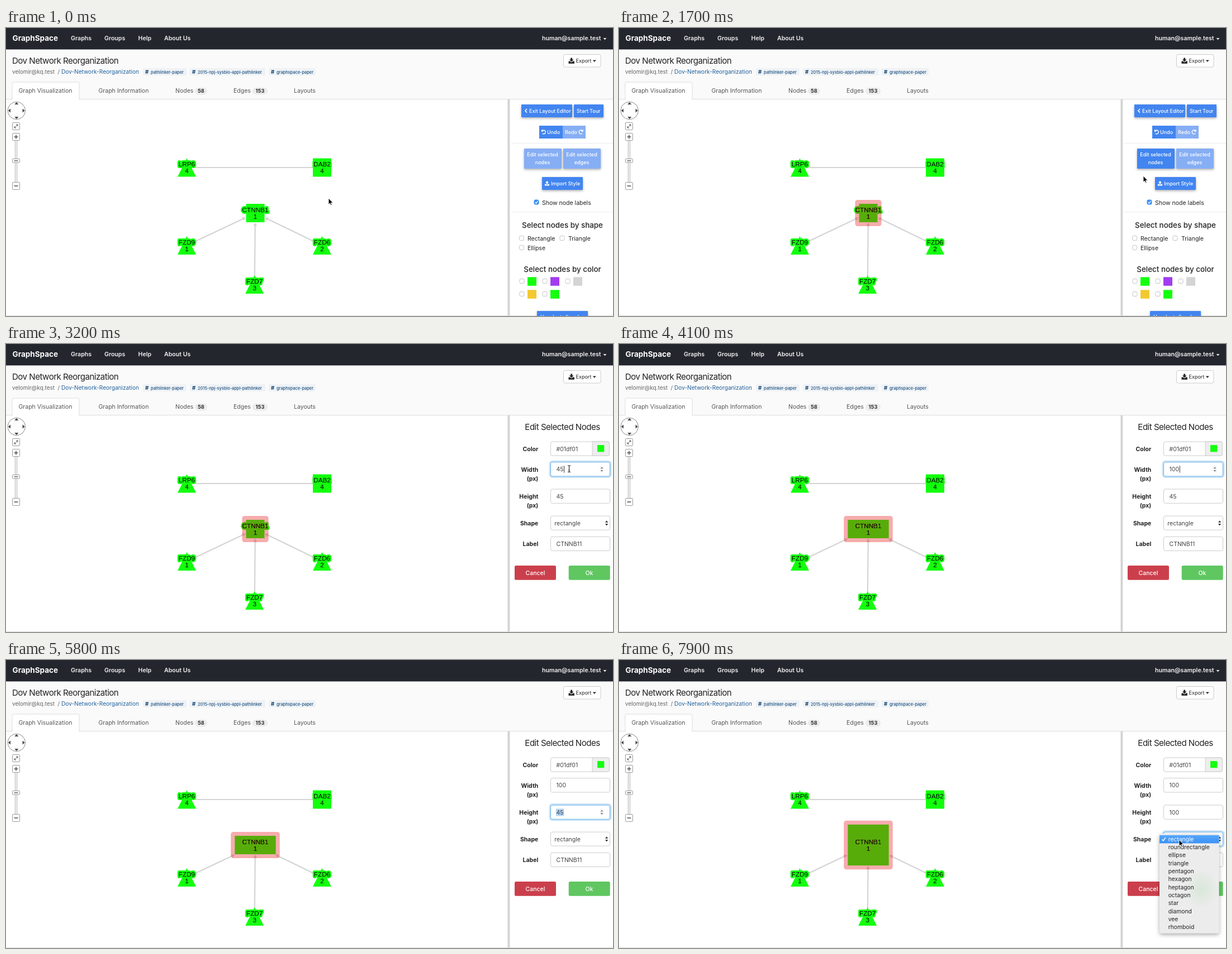
Write an HTML page that moves like this. It is 1086x516 px and loops after 8 s.

```html
<!DOCTYPE html>
<html lang="en">
<head>
<meta charset="utf-8">
<title>Graph layout editor</title>
<style>
html, body { margin: 0; width: 100%; height: 100%; overflow: hidden; background: #fff; }
svg { display: block; width: 1086px; height: 516px; font-family: Inter, sans-serif; font-size: 10.5px; }
text { white-space: pre; }
.label { font: 11.73px "Liberation Sans", Arial, sans-serif; text-anchor: middle; }
.title { font-size: 15.1px; letter-spacing: -.52px; }
</style>
</head>
<body>
<svg viewBox="0 0 1086 516">
  <defs>
    <filter id="lift" x="-20%" y="-30%" width="140%" height="190%">
      <feDropShadow dx="0" dy="1.8" stdDeviation="2" flood-color="#000" flood-opacity=".33"/>
    </filter>
    <filter id="menu" x="-20%" y="-10%" width="140%" height="125%">
      <feDropShadow dx="0" dy="3" stdDeviation="3.5" flood-color="#000" flood-opacity=".33"/>
    </filter>
    <linearGradient id="pick" x2="0" y2="1">
      <stop stop-color="#57a6fa"/><stop offset="1" stop-color="#3a92f6"/>
    </linearGradient>
    <radialGradient id="tint">
      <stop stop-color="#5fc660" stop-opacity=".14"/><stop offset="1" stop-color="#5fc660" stop-opacity="0"/>
    </radialGradient>
  </defs>
  <g id="page"></g>
  <g id="graph"></g>
  <g id="panel"></g>
  <g id="pointer"></g>
</svg>
<script>
const LOOP = 8000, STEP = 100;
const GREEN = '#13ff0d', BLUE = '#4285f0', PALE = '#86aef4', EDGE = '#d4d4d4';
const SCALE = 33 / 45;
const $ = id => document.getElementById(id);

const rect = (x, y, w, h, fill, more = '') =>
  `<rect x="${x}" y="${y}" width="${w}" height="${h}" fill="${fill}" ${more}/>`;
const text = (x, y, s, more = '') => `<text x="${x}" y="${y}" ${more}>${s}</text>`;
const path = (d, more = '') => `<path d="${d}" ${more}/>`;
const size = (px, weight = 400) => ` font-size="${px}" font-weight="${weight}"`;
const mid = 'text-anchor="middle"';
const end = 'text-anchor="end"';
const line = (color, w = 1) => `fill="none" stroke="${color}" stroke-width="${w}"`;

// ---------- fixed page parts ----------

function tag(x, w, s) {
  return rect(x, 72, w, 13, '#eff2f5', 'rx="1.5"') +
    text(x + 4, 81.6, '#', size(9.5, 800) + ' fill="#1d5080"') +
    text(x + 14, 81.6, s, size(7.4, 500) + ' fill="#1d5080"');
}

function badge(x, w, s) {
  return rect(x, 106.5, w, 13, '#ececec', 'rx="6.5"') +
    text(x + w / 2, 116.4, s, mid + size(9.3, 700) + ' fill="#333"');
}

function header() {
  const nav = [[116, 'Graphs'], [176, 'Groups'], [236.5, 'Help'], [283, 'About Us']];
  const tabs = [[22.5, 'Graph Visualization'], [165.5, 'Graph Information'],
    [303, 'Nodes'], [407, 'Edges'], [515, 'Layouts']];
  return rect(0, 0, 1086, 128, '#fafafa') + rect(0, 0, 1086, 38.4, '#24262e') +
    text(11.5, 23.3, 'GraphSpace', size(13.5, 700) + ' fill="#fff"') +
    nav.map(([x, s]) => text(x, 22.4, s, size(10.6, 600) + ' fill="#f2f2f2"')).join('') +
    text(1064.5, 22.4, 'human@sample.test', end + size(10.6, 600) + ' fill="#f2f2f2"') +
    path('M1068.5 18h6l-3 3.2z', 'fill="#eee"') +
    text(11, 64, 'Dov Network Reorganization', 'class="title" fill="#222"') +
    text(11, 81.5, 'velomir@kq.test', size(10) + ' fill="#666"') +
    text(92.5, 81.5, '/', size(10) + ' fill="#666"') +
    text(99, 81.5, 'Dov-Network-Reorganization', size(10.1) + ' fill="#22629c"') +
    tag(245, 78, 'pathlinker-paper') + tag(329, 135, '2015-npj-sysbio-appl-pathlinker') +
    tag(470, 84, 'graphspace-paper') +
    rect(997.5, 47.5, 66.5, 22.5, '#fff', 'rx="3" stroke="#ccc"') +
    path('M1006.5 59.5h2.5l2.7 2 2.7-2h2.5v4.2h-10.4z M1010.2 53.5h3v3h2.4l-3.9 4-3.9-4h2.4z', 'fill="#222"') +
    text(1019.5, 62.2, 'Export', size(9.05) + ' fill="#222"') +
    path('M1049.8 57.6h6l-3 3.2z', 'fill="#222"') +
    path('M0 127.5H1086', line('#ddd')) +
    path('M11 128.5V100q0-3 3-3H128q3 0 3 3V128.5', 'fill="#fff" stroke="#ddd"') +
    tabs.map(([x, s]) => text(x, 116.2, s, 'fill="#555"')).join('') +
    badge(338, 22, '58') + badge(441, 27, '153');
}

function zoomBar() {
  const box = (y, h) => rect(11.5, y, 13, h, '#fff', 'stroke="#999" rx="1"');
  return '<circle cx="18.8" cy="148" r="15.7" fill="#fff" stroke="#888"/>' +
    path('M15.2 137l3.6-4 3.6 4z M15.2 159l3.6 4 3.6-4z M8 144.4l-4 3.6 4 3.6z M29.6 144.4l4 3.6-4 3.6z', 'fill="#444"') +
    box(169.5, 13) +
    path('M15 179l6-6 M18 173h3v3 M15 176v3h3', line('#555')) +
    rect(16.5, 201, 3, 76, '#fff', 'stroke="#aaa"') +
    box(188.5, 13) + path('M14.5 195h7 M18 191.5v7', line('#555', 1.6)) +
    box(234.5, 6.5) + path('M14.5 237.8h7', line('#555', 1.4)) +
    box(276.5, 13) + path('M14.5 283h7', line('#555', 1.6));
}

$('page').innerHTML = header() + zoomBar() +
  rect(897.5, 128, 3.8, 388, '#d3d3d3') + rect(0, 515, 1086, 1, '#dcdcdc');

// ---------- graph ----------

const nodes = {
  LRP6: [323.5, 250, 4], DAB2: [565.5, 250, 4, 'box'], CTNNB1: [446, 331.5, 1, 'box'],
  FZD9: [323.5, 389.5, 1], FZD6: [565.5, 389.5, 2], FZD7: [444.7, 459.5, 3]
};

function arrow(from, w, h) {
  const [sx, sy] = nodes[from], [cx, cy] = nodes.CTNNB1;
  const dx = sx - cx, dy = sy - cy, len = Math.hypot(dx, dy), ux = dx / len, uy = dy / len;
  const k = Math.min((w / 2 + .8) / Math.abs(ux), (h / 2 + .8) / Math.abs(uy));
  const x = cx + ux * k, y = cy + uy * k, bx = x + ux * 6, by = y + uy * 6;
  return path(`M${sx} ${sy}L${bx} ${by}`, line(EDGE, 2.2)) +
    path(`M${x} ${y}L${bx - uy * 3.5} ${by + ux * 3.5}L${bx + uy * 3.5} ${by - ux * 3.5}z`, `fill="${EDGE}"`);
}

function label(name, look) {
  const [x, y, rank] = nodes[name];
  return text(x, y - 1.8, name, 'class="label" ' + look) + text(x, y + 10.2, rank, 'class="label" ' + look);
}

function node(name, w, h) {
  const [x, y, , kind] = nodes[name];
  const shape = kind ? rect(x - w / 2, y - h / 2, w, h, GREEN)
    : path(`M${x} ${y - 16.5}l16.5 33h-33z`, `fill="${GREEN}"`);
  return shape + label(name, `${line(GREEN, 5.8)} stroke-linejoin="round"`) + label(name, 'fill="#000"');
}

function graph(s) {
  const w = s.width * SCALE, h = s.height * SCALE, pad = 7.1;
  const [cx, cy] = nodes.CTNNB1;
  let out = path('M323.5 250H565.5', line(EDGE, 2.2)) +
    ['FZD9', 'FZD7', 'FZD6'].map(n => arrow(n, w, h)).join('');
  for (const n in nodes) out += n === 'CTNNB1' ? node(n, w, h) : node(n, 33, 33);
  if (s.selected) out += rect(cx - w / 2 - pad, cy - h / 2 - pad, w + 2 * pad, h + 2 * pad,
    '#e40004', 'opacity=".325" rx="4.5"') + label('CTNNB1', 'fill="#1c1400"');
  return out;
}

// ---------- side panel: tools ----------

const button = (x, y, w, h, fill) => rect(x, y, w, h, fill, 'rx="1" filter="url(#lift)"');
const white = size(9, 500) + ' fill="#fff"';

function check(x, y, on) {
  return rect(x + .5, y + .5, 8, 8, on ? '#3b8df5' : '#fff', `rx="2" stroke="${on ? '#3b8df5' : '#c4c4c4'}"`) +
    (on ? path(`M${x + 2.2} ${y + 4.7}l1.8 2 3-4.4`, line('#fff', 1.3)) : '');
}

function tools(s) {
  const swatches = [[0, 0, GREEN], [41, 0, '#a23cf0'], [82, 0, '#d4d4d4'], [0, 23, '#f3c930'], [41, 23, GREEN]];
  const heading = (y, what) => text(995.5, y, 'Select nodes by ' + what, mid + size(13.4, 500) + ' fill="#222"');
  const pair = (x, word, on) => button(x, 216, 67, 36, on ? BLUE : PALE) +
    text(x + 33, 230.2, 'Edit selected', mid + white) + text(x + 33, 244.2, word, mid + white);
  const turn = (x, y, flip) => path('M-2.6 -2.2A3.4 3.4 0 1 1 -2.4 2.6 M-3.4 -4v2.8h2.8',
    line('#fff', 1.4) + ` transform="translate(${x} ${y}) scale(${flip} 1)"`);
  return button(922, 137, 91, 23, BLUE) + path('M932 145l-3 3.3 3 3.3', line('#fff', 1.6)) +
    text(936, 151.6, 'Exit Layout Editor', white) +
    button(1016, 137, 53, 23, BLUE) + text(1042.3, 151.6, 'Start Tour', mid + white) +
    rect(954, 175, 42, 23, BLUE) + turn(962, 186.3, 1) + text(968, 189.6, 'Undo', white) +
    rect(996, 175, 41, 23, PALE) + text(1000, 189.6, 'Redo', white) + turn(1028.5, 186.3, -1) +
    path('M904 206.5H1086 M904 329.5H1086', line('#ececec')) +
    pair(927, 'nodes', s.selected) + pair(997, 'edges', false) +
    button(959, 267, 73, 23, BLUE) +
    path('M964 279.5h2.2v1h3.6v-1h2.2v3h-8z M968 274l3 3.2h-1.9v2.3h-2.2v-2.3h-1.9z', 'fill="#fff"') +
    text(975, 281.6, 'Import Style', white) +
    check(944.5, 307.5, true) + text(959, 317, 'Show node labels', 'fill="#222"') +
    heading(357.6, 'shape') +
    check(918, 372) + text(933, 381, 'Rectangle', 'fill="#222"') +
    check(990.5, 372) + text(1006, 381, 'Triangle', 'fill="#222"') +
    check(918, 389) + text(933, 398.2, 'Ellipse', 'fill="#222"') +
    heading(436.8, 'color') +
    swatches.map(([x, y, c]) => check(918.5 + x, 449 + y) + rect(933 + x, 446.3 + y, 16, 15.5, c)).join('') +
    button(950, 507, 91, 23, BLUE) + text(995.5, 521.3, 'Unselect all nodes', mid + white);
}

// ---------- side panel: form ----------

const textWidth = v => [...v].reduce((sum, c) => sum + (c === '1' ? 4.6 : 6.6), 0);

function field(y, h, focus, w = 106) {
  const glow = focus ? rect(973, y - 1.5, w + 3, h + 3, 'none', 'rx="4.5" stroke="#66afe9" stroke-opacity=".35" stroke-width="3"') : '';
  return glow + rect(974.5, y, w, h, '#fff', `rx="3" stroke="${focus ? '#66afe9' : '#ccc'}"`);
}

function numberField(y, value, focus, hover, marked, caret) {
  const w = textWidth(value);
  let out = field(y, 25.3, focus);
  if (marked) out += rect(984, y + 6.5, w + 1, 13, '#b1d3f6');
  out += text(984.5, y + 16.6, value, 'fill="#444"');
  if (focus && caret && !marked) out += rect(985 + w, y + 6.5, .9, 12.5, '#222');
  if (focus || hover) out += rect(1062.5, y + 7, 7, 11.5, '#f1f1f1', 'rx="3"') +
    path(`M1064 ${y + 11.3}l2-2.4 2 2.4z M1064 ${y + 14.3}l2 2.4 2-2.4z`, 'fill="#666"');
  return out;
}

const shapes = ['rectangle', 'roundrectangle', 'ellipse', 'triangle', 'pentagon', 'hexagon',
  'heptagon', 'octagon', 'star', 'diamond', 'vee', 'rhomboid'];

function menu() {
  return rect(967, 311, 106.5, 178.3, '#ececec', 'rx="3.5" filter="url(#menu)"') +
    rect(1010, 375, 63.5, 70, 'url(#tint)') +
    rect(967, 313.8, 106.5, 14.6, 'url(#pick)') +
    path('M971.5 321.2l2.2 2.8 4-6', line('#fff', 1.4)) +
    shapes.map((s, i) => text(982.7, 324.7 + i * 14.32, s, size(10.3) + ` fill="${i ? '#222' : '#fff'}"`)).join('');
}

function form(s) {
  const names = [[191.6, 'Color'], [228.6, 'Width'], [244.5, '(px)'], [276.8, 'Height'],
    [292.8, '(px)'], [325, 'Shape'], [362, 'Label']];
  return text(995.5, 153.6, 'Edit Selected Nodes', 'class="title" fill="#222" ' + mid) +
    names.map(([y, n]) => text(952.3, y, n, end + size(10.5, 700) + ' fill="#222"')).join('') +
    field(175, 25, false, 105) + text(984.5, 191.6, '#01df01', 'fill="#444"') +
    path('M1049 175H1076.5q3 0 3 3V197q0 3-3 3H1049z', 'fill="#eee" stroke="#ccc"') +
    rect(1058, 181, 12.3, 12.3, GREEN) +
    numberField(211.7, s.widthText, s.focus === 'width', false, s.markWidth, s.caret) +
    numberField(260, s.heightText, s.focus === 'height', s.overHeight, s.markHeight, s.caret) +
    field(308.2, 25, s.focus === 'shape') + text(981.3, 324.8, 'rectangle', 'fill="#444"') +
    path('M1072 319.8l2.6-3.6 2.6 3.6z M1072 322l2.6 3.6 2.6-3.6z', 'fill="#333"') +
    field(345.3, 25.2) + text(984.5, 361.7, 'CTNNB11', 'fill="#444"') +
    rect(910, 397, 74, 25.7, '#cb3f4c', 'rx="2.5"') +
    text(947, 413.5, 'Cancel', mid + size(10.5, 500) + ' fill="#fff"') +
    rect(1006.7, 397, 74, 25.7, '#5fc660', 'rx="2.5"') +
    text(1043.5, 413.5, 'Ok', mid + size(10.5, 500) + ' fill="#fff"') +
    (s.focus === 'shape' ? menu() : '');
}

// ---------- pointer ----------

const track = [[0, 577, 305], [200, 577, 305], [700, 447, 333], [900, 447, 333], [1700, 938, 265],
  [2000, 958, 240], [2300, 958, 240], [2800, 1007.5, 223.5], [4400, 1007.5, 223.5], [4800, 1001.5, 276],
  [6500, 1001.5, 276], [6900, 1001, 328], [7300, 1002, 322], [LOOP, 1002, 322]];

function pointerAt(t) {
  const i = track.findIndex(k => k[0] > t), [t0, x0, y0] = track[i - 1], [t1, x1, y1] = track[i];
  const p = (t - t0) / (t1 - t0), e = p * p * (3 - 2 * p);
  return [x0 + (x1 - x0) * e, y0 + (y1 - y0) * e];
}

function pointer(t) {
  const typing = (t >= 3900 && t < 4400) || (t >= 5700 && t < 6500);
  if (typing) return '';
  const [x, y] = pointerAt(t), at = ` transform="translate(${x} ${y})"`;
  if (t >= 2700 && t < 6600)
    return path('M-2.5 -6Q0 -6 0 -4.5Q0 -6 2.5 -6 M0 -4.5V4.5 M-2.5 6Q0 6 0 4.5Q0 6 2.5 6 M-1.3 2.5h2.6',
      line('#222', 1.1) + at);
  return path('M0 0V11.2L2.5 8.9 4.2 12.6 6 11.8 4.4 8.2H7.9z',
    'fill="#000" stroke="#fff" stroke-width=".9"' + at);
}

// ---------- timeline ----------

const typed = (t, start) => t < start ? '45' : '100'.slice(0, 1 + Math.floor((t - start) / 100));

function state(t) {
  const widthText = typed(t, 3900), heightText = typed(t, 6100);
  return {
    selected: t >= 800, editing: t >= 2200, widthText, heightText,
    width: +widthText, height: +heightText,
    focus: t >= 7400 ? 'shape' : t >= 5200 ? 'height' : t >= 2900 ? 'width' : '',
    markWidth: t >= 3600 && t < 3900, markHeight: t >= 5400 && t < 6100,
    overHeight: t >= 4700 && t < 6600, caret: t % 800 < 400
  };
}

let shown = -1;
function draw(now) {
  const t = Math.floor(now % LOOP / STEP) * STEP;
  if (t !== shown) {
    shown = t;
    const s = state(t);
    $('graph').innerHTML = graph(s);
    $('panel').innerHTML = s.editing ? form(s) : tools(s);
    $('pointer').innerHTML = pointer(t);
  }
}

const begin = performance.now();
function tick() {
  draw(performance.now() - begin);
  requestAnimationFrame(tick);
}
tick();
</script>
</body>
</html>
```
